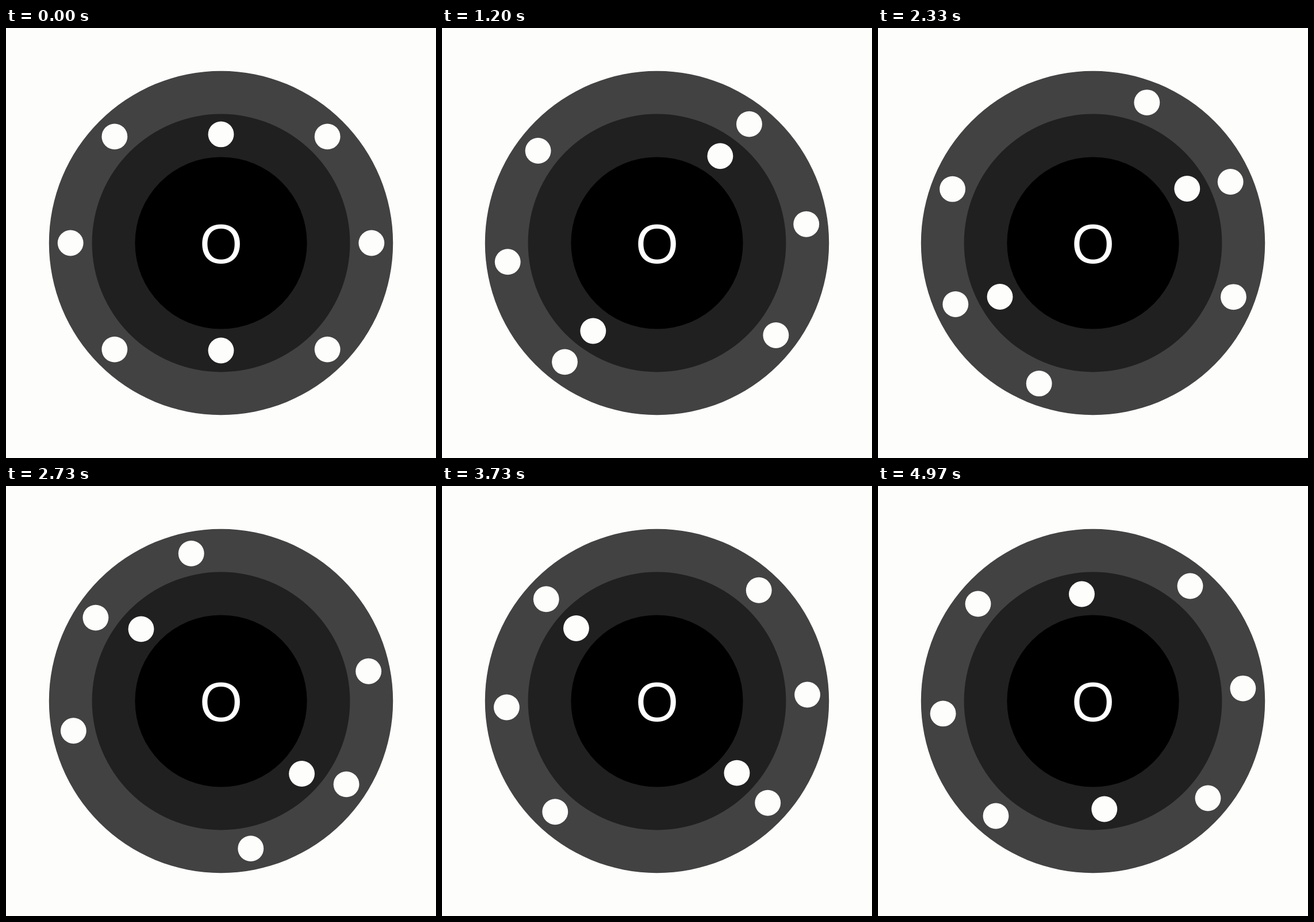
These frames come from a looping animation (748x748 px, 5.01 s). An HTML page with a canvas:

```html
<!DOCTYPE html>
<html lang="en">
<head>
<meta charset="utf-8">
<title>Atom</title>
<style>
html, body { margin: 0; width: 100%; height: 100%; overflow: hidden; background: #fdfdfb; }
canvas { display: block; width: 748px; height: 748px; }
</style>
</head>
<body>
<canvas id="stage" width="748" height="748"></canvas>
<script>
const ctx = document.getElementById('stage').getContext('2d');
const LOOP = 5010, STEPS = 150;
const C = 374, UNIT = 1.496;
const PAPER = '#fdfdfb';

// Radius and colour of each shell, outermost first
const shells = [[200, '#424242'], [150, '#202021'], [100, '#000']];

// Each electron: orbit radius, starting angle, degrees per step
const electrons = [
  [126.4, -90, 6], [125, 90, 6],
  ...[0, 45, 135, 180, 225, 315].map(a => [175, a, 4.8])
];

function disc(x, y, r, color) {
  ctx.fillStyle = color;
  ctx.beginPath();
  ctx.arc(x, y, r * UNIT, 0, Math.PI * 2);
  ctx.fill();
}

// 30 steps per second, on a 10 ms clock
function stepAt(ms) {
  const t = Math.floor((ms % LOOP) / 10) * 10;
  return Math.min(STEPS - 1, Math.floor((t + 5) * 0.03));
}

function draw(step) {
  ctx.fillStyle = PAPER;
  ctx.fillRect(0, 0, 748, 748);
  for (const [r, color] of shells) disc(C, C, r, color);

  ctx.fillStyle = '#fff';
  ctx.font = '96px "Liberation Sans", Arial, sans-serif';
  ctx.textAlign = 'center';
  ctx.textBaseline = 'alphabetic';
  ctx.fillText('O', C, 408.6);

  for (const [orbit, start, speed] of electrons) {
    const a = (start + speed * step) * Math.PI / 180;
    const r = orbit * UNIT;
    disc(C + r * Math.cos(a), C + r * Math.sin(a), 15, PAPER);
  }
}

let origin = null;
function tick(now) {
  if (origin === null) origin = now;
  draw(stepAt(now - origin));
  requestAnimationFrame(tick);
}
draw(0);
requestAnimationFrame(tick);
</script>
</body>
</html>
```
